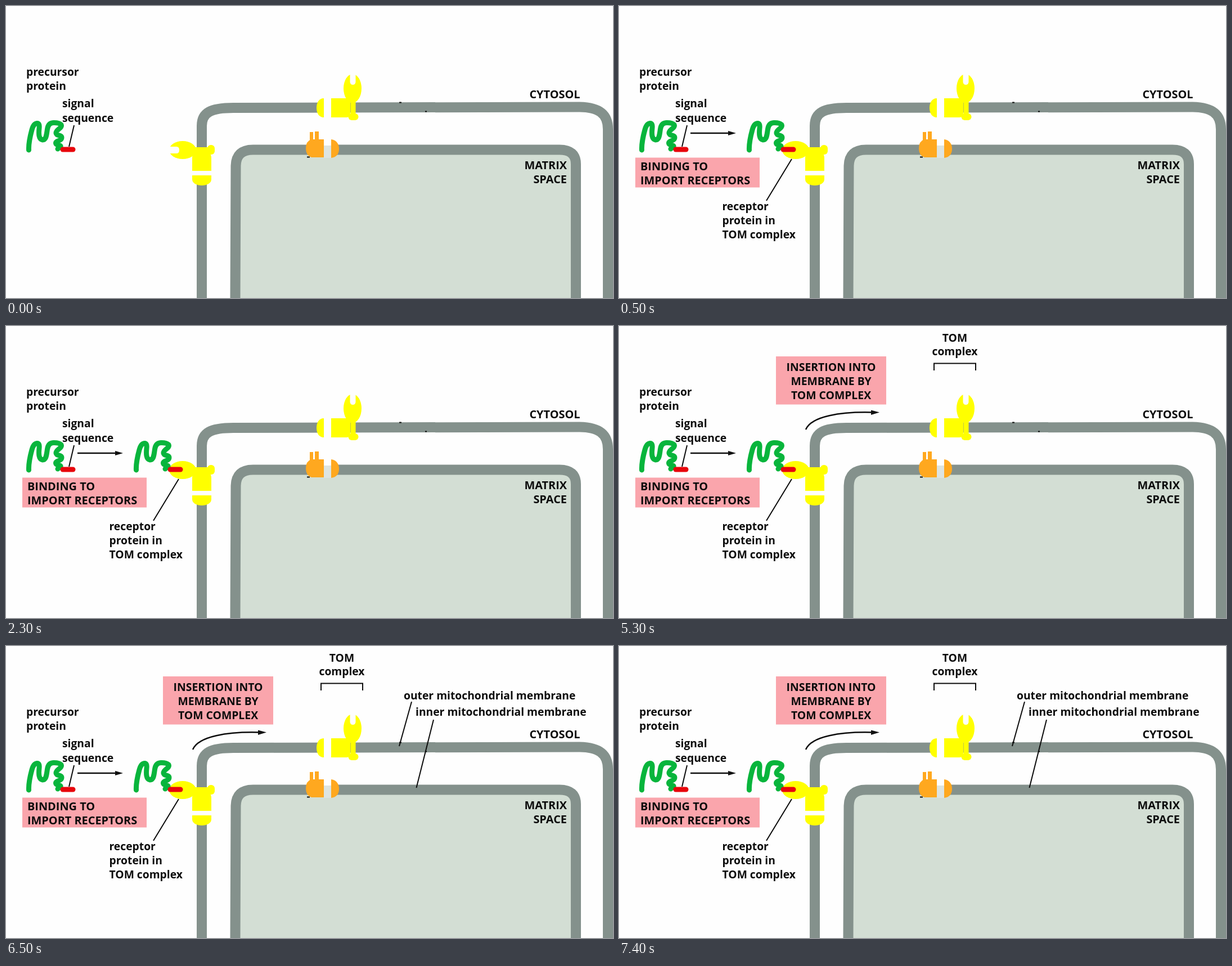
Write an HTML page that moves like this. It is 1079 by 519 pixels and loops after 8 s.

```html
<!DOCTYPE html>
<html lang="en">
<head>
<meta charset="utf-8">
<title>Protein import</title>
<style>
  html, body { margin: 0; width: 100%; height: 100%; overflow: hidden; background: #fefefe; }
  svg { display: block; width: 100vw; height: 100vh; }
  text { font: 700 19.3px "Open Sans", "Noto Sans", sans-serif; fill: #0c0c0c; }
  .caps { font-size: 19.9px; }
  .title { font-size: 19.4px; }
  .mid { text-anchor: middle; }
  .end { text-anchor: end; }
  .line { fill: none; stroke: #0c0c0c; stroke-width: 2; }
  .bold { stroke-width: 2.6; }
  .membrane { fill: none; stroke: #84918c; stroke-width: 18; }
  .pink { fill: #faa5ac; }
  .yellow { fill: #ff0; }
  .orange { fill: #ffa81f; }
  .white { fill: #fefefe; }
</style>
</head>
<body>
<svg viewBox="0 0 1079 519" preserveAspectRatio="none">
  <defs>
    <g id="protein" fill="none" stroke-linecap="round" stroke-linejoin="round">
      <path stroke="#08b53c" stroke-width="9" d="M40.500 256C40 246 43 231 46 220Q49 209 55 208.500Q60 208 59 217C58 227 58 237 65 238C72 238 72 228 73.500 219Q75 208 84 207.500Q94 207 98 211C101 217 88 220 89 226C90 232 99 228 99 234C99 241 88 238 88.500 244C89 249 98 246 97 250Q94 252 92 254"/>
      <path stroke="#e8060c" stroke-width="9" d="M101 255H119"/>
    </g>
  </defs>

  <path fill="#d3ded4" d="M407.500 519L408.500 284Q409 255.500 439 255.500H984Q1013 255.500 1013 281V519Z"/>
  <path class="membrane" d="M348 519V213C348 190 363 181 404 181L1020 179.500C1052 180 1070 190 1070 219V519"/>
  <path class="membrane" d="M407.500 519L408.500 284Q409 255.500 439 255.500H984Q1013 255.500 1013 281V519"/>
  <path class="line" d="M699 171.500H703M745 187.500H748M535 268.500H540"/>

  <!-- Translocator in the upper membrane -->
  <rect class="white" x="564" y="163" width="14" height="36"/>
  <g class="yellow">
    <path d="M565 164C556 164 552 172 552 181S556 198 565 198Z"/>
    <path d="M578 164H605Q612 164 612 172V190Q612 198 605 198H578Z"/>
    <ellipse cx="616" cy="146.500" rx="16" ry="25.500"/>
    <rect x="612.500" y="168" width="9" height="28"/>
    <rect x="608.500" y="191" width="18" height="12" rx="6"/>
  </g>
  <path class="white" d="M611.500 119H621.500V135Q621 140 616.500 140T611.500 135Z"/>

  <!-- Translocator in the left membrane -->
  <rect class="white" x="331" y="292" width="34" height="10"/>
  <g class="yellow">
    <path d="M331 293V269Q331 261 339 260H357Q365 261 365 269V293Z"/>
    <path d="M331 301H365V308C365 315 357 319 348 319S331 315 331 308Z"/>
    <ellipse cx="314" cy="256" rx="24" ry="16"/>
    <rect x="334" y="251" width="30" height="10"/>
    <rect x="358" y="247" width="13" height="17" rx="6"/>
  </g>
  <path id="notch" class="white" d="M288 250H303Q308 250 308 256T303 262H288Z"/>

  <!-- Translocator in the inner membrane -->
  <rect fill="#dde4e1" x="565" y="248" width="13" height="22"/>
  <rect class="white" x="565" y="240" width="13" height="8"/>
  <g class="orange">
    <path d="M565 237H543Q533 240 533 253T543 269H565Z"/>
    <path d="M540 224H546V240H540ZM549 223H556V240H549Z"/>
    <path d="M578 237C588 238 592 246 592 254S588 269 578 270Z"/>
  </g>

  <use href="#protein"/>
  <path class="line" d="M121 212L112 250"/>
  <text x="36" y="124">precursor</text>
  <text x="36" y="149">protein</text>
  <text x="100" y="180">signal</text>
  <text x="100" y="206">sequence</text>
  <text class="caps end" x="1020.500" y="164">CYTOSOL</text>
  <text class="caps end" x="997" y="290">MATRIX</text>
  <text class="caps end" x="997" y="315">SPACE</text>

  <g data-from="500">
    <use href="#protein" x="191"/>
    <path class="line bold" d="M127 226H197"/>
    <path fill="#111" d="M194 222L208 226L194 230Z"/>
    <rect class="pink" x="29" y="269.500" width="221" height="53"/>
    <text class="caps" x="38" y="292">BINDING TO</text>
    <text class="caps" x="38" y="317">IMPORT RECEPTORS</text>
    <path class="line" d="M307 272L262 346"/>
    <text x="183.500" y="363">receptor</text>
    <text x="183.500" y="388">protein in</text>
    <text x="183.500" y="413">TOM complex</text>
  </g>

  <g data-from="3500">
    <rect class="pink" x="279" y="54" width="196" height="85.500"/>
    <text class="title mid" x="377" y="80">INSERTION INTO</text>
    <text class="title mid" x="377" y="105">MEMBRANE BY</text>
    <text class="title mid" x="377" y="130">TOM COMPLEX</text>
    <path class="line bold" d="M332 184C342 160 395 152 451 153.500"/>
    <path fill="#111" d="M448 149.500L463 153.500L448 158Z"/>
    <text class="mid" x="597" y="28">TOM</text>
    <text class="mid" x="597" y="52">complex</text>
    <path class="line" d="M560 79V66.500H634V79"/>
  </g>

  <g data-from="6500">
    <text x="707" y="95">outer mitochondrial membrane</text>
    <text x="728" y="124">inner mitochondrial membrane</text>
    <path class="line" d="M721 99L699 178M760 131L729.500 252"/>
  </g>
</svg>
<script>
  const LOOP = 8000;
  const steps = [...document.querySelectorAll("[data-from]")];
  const notch = document.getElementById("notch");
  const show = (node, on) => node.setAttribute("visibility", on ? "visible" : "hidden");

  function draw(time) {
    for (const step of steps) show(step, time >= Number(step.dataset.from));
    show(notch, time < 500); // the bound protein fills the receptor
  }

  const start = performance.now();
  function tick() {
    draw((performance.now() - start) % LOOP);
    requestAnimationFrame(tick);
  }
  tick();
</script>
</body>
</html>
```
